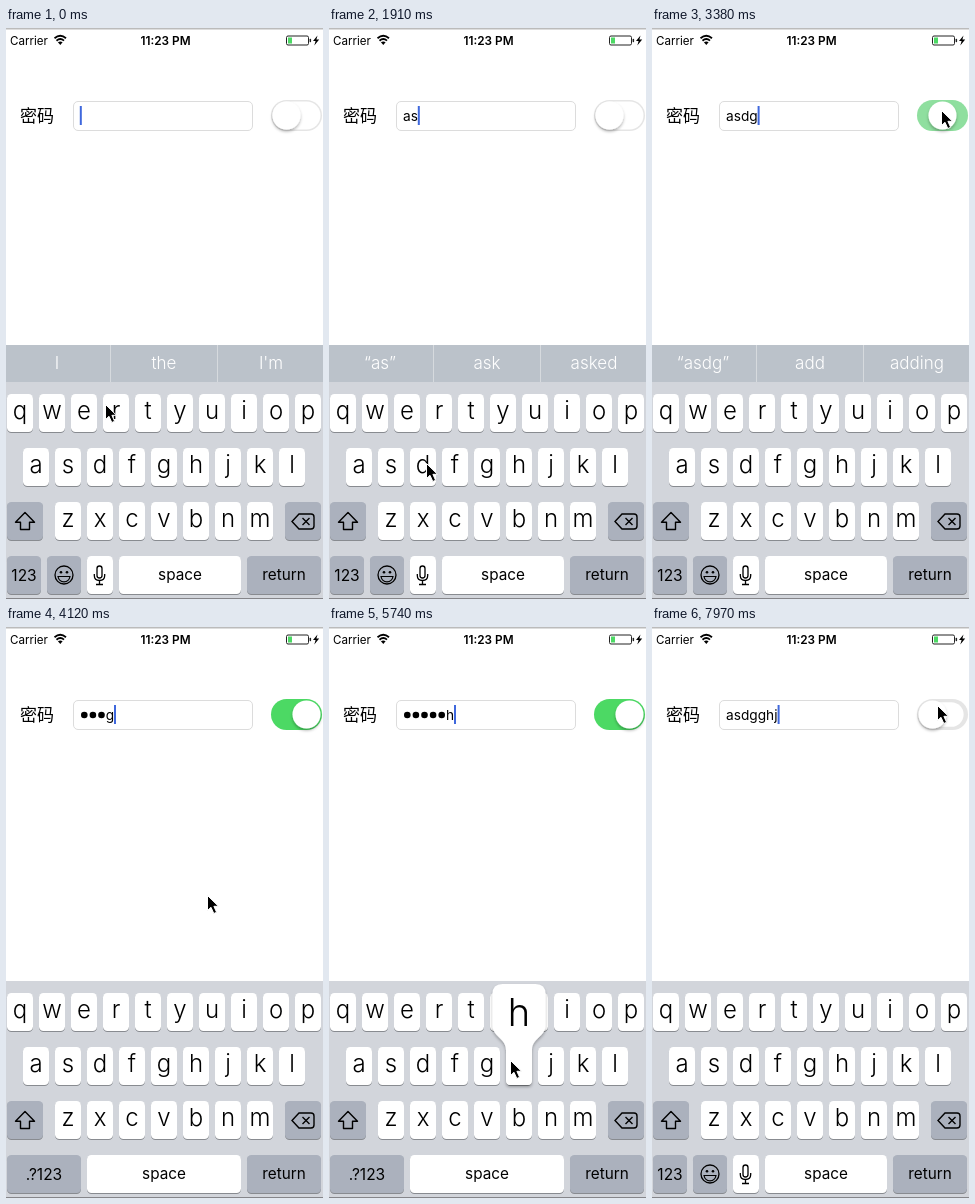
An HTML page for the animation above (8 s loop, 317 by 571 pixels).

```html
<!DOCTYPE html>
<html lang="zh">
<head>
<meta charset="utf-8">
<title>Password field</title>
<style>
  html, body { margin: 0; width: 100%; height: 100%; overflow: hidden; background: #fff; }
  svg { display: block; width: 317px; height: 571px; font-family: Inter, Roboto, sans-serif; }
  .cjk { font-family: "Noto Sans CJK SC", "Noto Sans CJK", sans-serif; }
</style>
</head>
<body>
<svg id="stage" viewBox="0 0 317 571"></svg>
<script>
const stage = document.getElementById('stage');
const LOOP = 8000, STEP = 147.5;

// Tick at which each key goes down
const presses = [[6, 'a'], [10, 's'], [14, 'd'], [19, 'g'], [32, 'g'], [39, 'h'], [43, 'j']];
// Pointer stops: tick, x, y
const stops = [
  [0, 99, 376], [4, 31, 425], [7, 31, 425], [9, 62, 433], [11, 62, 433],
  [13, 97, 435], [15, 97, 435], [18, 147, 437], [19, 147, 437], [21, 293, 84],
  [22, 289, 82], [25, 289, 82], [28, 201, 268], [30, 151, 433], [34, 151, 433],
  [37, 181, 433], [40, 181, 433], [41, 218, 434], [44, 218, 434], [45, 245, 435],
  [48, 245, 435], [51, 285, 78], [55, 285, 78]
];
// Suggestions shown from a tick on
const hints = [
  [0, 'I', 'the', "I'm"], [7, '“a”', 'and', 'as'], [11, '“as”', 'ask', 'asked'],
  [15, '“asd”', 'add', 'adding'], [20, '“asdg”', 'add', 'adding']
];
const widths = { a: 7.7, s: 7.3, d: 8.4, g: 8.4, h: 8.2, j: 3.4 };
const DOT = 8.6;
const rows = [['qwertyuiop', 1, 366], ['asdfghjkl', 17, 420], ['zxcvbnm', 49, 474]];

const rect = (x, y, w, h, fill, r = 0, more = '') =>
  `<rect x="${x}" y="${y}" width="${w}" height="${h}" rx="${r}" fill="${fill}" ${more}/>`;
const circle = (x, y, r, fill, more = '') =>
  `<circle cx="${x}" cy="${y}" r="${r}" fill="${fill}" ${more}/>`;
const line = (d, width = 1.4, more = '') =>
  `<path d="${d}" fill="none" stroke="#000" stroke-width="${width}" ${more}/>`;
const text = (s, x, y, size, more = '') =>
  `<text x="${x}" y="${y}" font-size="${size}" ${more}>${s}</text>`;
const mid = 'text-anchor="middle"';
const key = (x, y, w, fill = '#fff') =>
  rect(x, y + 1, w, 38, '#888b90', 4.5) + rect(x, y, w, 38, fill, 4.5);
const grey = (x, y, w) => key(x, y, w, '#abb1bd');

const defs = `<defs><filter id="soft" x="-30%" y="-30%" width="160%" height="170%">
  <feDropShadow dx="0" dy="2" stdDeviation="1.6" flood-opacity=".3"/></filter></defs>`;

const header = rect(0, 0, 317, 571, '#fff') + rect(0, 0, 317, 1.5, '#bbb') +
  text('Carrier', 4, 17, 11.6) +
  line('M48.5 10.2Q54.3 5.4 60 10.2M50.5 12.7Q54.3 9.4 58 12.7', 1.8) +
  '<path d="M51.9 14.2Q54.3 12.6 56.6 14.2L54.3 17Z"/>' +
  text('11:23 PM', 159.5, 17, 11.8, mid + ' font-weight="600"') +
  rect(280.5, 8, 22, 9, 'none', 1.5, 'stroke="#222" stroke-width="1"') +
  rect(282, 9.5, 4, 6, '#4cd964') + rect(303.6, 10.8, 1.5, 3.5, '#222', .7) +
  '<path d="M311.5 7.5L307 13h2.6l-1.3 4.5 4.9-5.9h-2.8z"/>' +
  text('密码', 14, 94, 17, 'class="cjk"') +
  rect(67.5, 73.5, 179, 29, '#fff', 4.5, 'stroke="#dcdcdc"');

const letters = rows.map(([chars, x, y]) => [...chars].map((c, i) =>
  key(x + 32 * i, y, 26) +
  text(c, x + 32 * i + 13, y + 25, 24, mid + ' font-weight="300"')).join('')).join('');

const icons = grey(1, 474, 36) + grey(279, 474, 36) +
  line('M19 484.5L28.5 494.2H23.5V501.5H14.5V494.2H9.5Z', 1.4, 'stroke-linejoin="round"') +
  line('M293 486H305Q308 486 308 489V498Q308 501 305 501H293L286 493.5Z') +
  line('M296.5 490l7 7m0-7l-7 7');

const keyboard = rect(0, 354, 317, 217, '#d2d5db') + letters + icons +
  grey(241, 528, 74) + text('return', 278, 552, 15.3, mid) + rect(0, 570, 317, 1, '#858589');

const plainRow = grey(1, 528, 34) + text('123', 18, 553, 15.5, mid) + grey(41, 528, 34) +
  circle(58, 547, 9, 'none', 'stroke="#000" stroke-width="1.3"') +
  circle(55, 544.3, 1.3, '#000') + circle(61, 544.3, 1.3, '#000') +
  line('M52 548.5H64Q63 553.8 58 553.8Q53 553.8 52 548.5Z', 1.2) +
  key(81, 528, 26) + rect(91, 538, 5, 12, 'none', 2.5, 'stroke="#000" stroke-width="1.3"') +
  line('M88.3 546v1.5q0 5 5.2 5t5.2-5V546M93.5 552.5v4M90 556.5h7', 1.3) +
  key(113, 528, 122) + text('space', 174, 552, 15.3, mid);

const secureRow = grey(1, 528, 74) + text('.?123', 38, 553, 15.5, mid) +
  key(81, 528, 154) + text('space', 158, 552, 15.3, mid);

function hintBar(n) {
  const words = hints.filter(h => h[0] <= n).pop().slice(1);
  const picked = n >= 16 && n < 20;
  return rect(0, 317, 317, 37, '#bbc2ca') +
    rect(104, 317, 1, 37, '#d6dade') + rect(211, 317, 1, 37, '#d6dade') +
    (picked ? rect(104, 317, 108, 37, '#ebedef') : '') +
    words.map((w, i) => text(w, 51 + 107 * i, 341, 17,
      `${mid} font-weight="${picked && i == 1 ? 400 : 300}" fill="${picked && i == 1 ? '#1672e0' : '#fff'}"`)).join('');
}

function field(n, secure) {
  const typed = presses.filter(p => p[0] <= n);
  const word = typed.map(p => p[1]).join('');
  const dots = secure ? word.length - 1 : 0;
  const rest = word.slice(dots);
  const end = [...rest].reduce((sum, c) => sum + widths[c], dots * DOT);
  let out = n >= 16 && n < 19 ? rect(72, 78, 27, 20, '#c8dff0') : '';
  for (let i = 0; i < dots; i++) out += circle(74 + DOT * (i + .5), 88, 3.3, '#000');
  out += text(rest, 74 + dots * DOT, 92.5, 13.7);
  // The caret stays lit after a key, then blinks
  const since = n - (typed.length ? typed[typed.length - 1][0] : -4);
  const phase = (since - 5) % 7;
  const alpha = since < 5 || phase > 2 ? 1 : phase ? 0 : .25;
  return out + rect(73.8 + end, 78, 2, 19, '#3f68dd', 0, `opacity="${alpha}"`);
}

function toggle(n) {
  const [knob, fill, hole] =
    n < 23 ? [0, '#e5e5e5', 1] :
    n < 24 ? [.5, '#8fdf9f', 0] :
    n < 53 ? [1, '#4cd964', 0] :
    n < 54 ? [.4, '#a5dfb0', 0] : [0, '#e5e5e5', .88];
  const w = 48 * hole, h = 28 * hole;
  return rect(265, 72, 51, 31, fill, 15.5) +
    rect(290.5 - w / 2, 87.5 - h / 2, w, h, '#fff', h / 2) +
    circle(280.5 + 20 * knob, 87.5, 14, '#fff', 'filter="url(#soft)"');
}

function popup(n) {
  const hit = presses.find(p => p[0] == n);
  if (!hit) return '';
  const [chars, x0, y] = rows[1];
  const x = x0 + 13 + 32 * chars.indexOf(hit[1]);
  return `<path transform="translate(${x} ${y})" filter="url(#soft)" fill="#fff"
    d="M-16.5-63H16.5Q26.5-63 26.5-53V-22C26.5-10 13-9 13 3V33.5Q13 38 8.5 38H-8.5Q-13 38-13 33.5V3C-13-9-26.5-10-26.5-22V-53Q-26.5-63-16.5-63Z"/>` +
    text(hit[1], x, y - 21, 38, mid + ' font-weight="300"');
}

function pointer(n) {
  const i = stops.findIndex(s => s[0] > n);
  const [a, ax, ay] = stops[i - 1], [b, bx, by] = stops[i];
  const u = (n - a) / (b - a), e = u * u * (3 - 2 * u);
  return `<path transform="translate(${ax + (bx - ax) * e} ${ay + (by - ay) * e})"
    d="M.5.5V15.5L4 12.3 6.8 18.5 9.6 17.3 6.9 11.3H11.5Z" stroke="#fff" stroke-width="1"/>`;
}

function scene(n) {
  const secure = n >= 24 && n < 54;
  return defs + header + field(n, secure) + toggle(n) + (n < 24 ? hintBar(n) : '') +
    keyboard + (secure ? secureRow : plainRow) + popup(n) + pointer(n);
}

let shown = -1;
function draw() {
  const n = Math.floor((performance.now() % LOOP + 16) / STEP);
  if (n !== shown) stage.innerHTML = scene(shown = n);
  requestAnimationFrame(draw);
}
draw();
</script>
</body>
</html>
```
